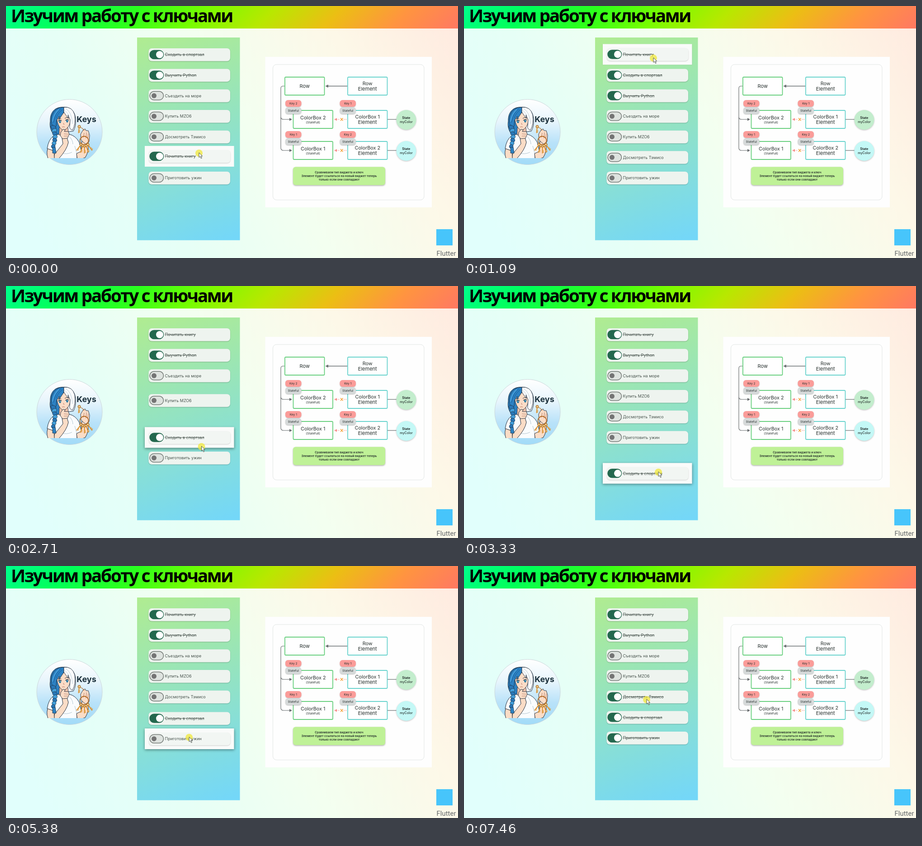
Write an HTML page with a canvas that moves like this. It is 1000 px wide and 560 px high and loops after 7.53 s.

```html
<!DOCTYPE html>
<html lang="ru">
<head>
<meta charset="utf-8">
<title>Изучим работу с ключами</title>
<style>
html, body { margin: 0; width: 100%; height: 100%; overflow: hidden; }
canvas { display: block; width: 1000px; height: 560px; }
</style>
</head>
<body>
<canvas id="stage"></canvas>
<script>
const W = 1000, H = 560, LOOP = 7530;
const dpr = window.devicePixelRatio || 1;
const stage = document.getElementById('stage');
const INTER = 'Inter, "Open Sans", sans-serif';

function setup(canvas) {
  canvas.width = W * dpr;
  canvas.height = H * dpr;
  const context = canvas.getContext('2d');
  context.scale(dpr, dpr);
  return context;
}

const screenCtx = setup(stage);
const backdrop = document.createElement('canvas');
let ctx = setup(backdrop);

// ---- drawing helpers ----
function gradient(x0, y0, x1, y1, colors) {
  const g = ctx.createLinearGradient(x0, y0, x1, y1);
  colors.forEach((c, i) => g.addColorStop(i / (colors.length - 1), c));
  return g;
}

function box(x, y, w, h, r, fill, line, lw = 1) {
  ctx.beginPath();
  ctx.roundRect(x, y, w, h, r);
  paint(fill, line, lw);
}

function disc(x, y, r, fill, line, lw = 1) {
  ctx.beginPath();
  ctx.arc(x, y, r, 0, 7);
  paint(fill, line, lw);
}

function oval(x, y, rx, ry, angle, fill, line, lw = 1) {
  ctx.beginPath();
  ctx.ellipse(x, y, rx, ry, angle, 0, 7);
  paint(fill, line, lw);
}

function paint(fill, line, lw) {
  if (fill) { ctx.fillStyle = fill; ctx.fill(); }
  if (line) { ctx.strokeStyle = line; ctx.lineWidth = lw; ctx.stroke(); }
}

function shape(d, fill, line, lw = 1) {
  const p = new Path2D(d);
  if (fill) { ctx.fillStyle = fill; ctx.fill(p); }
  if (line) { ctx.strokeStyle = line; ctx.lineWidth = lw; ctx.stroke(p); }
}

function shadowed(alpha, blur, dy, draw) {
  ctx.save();
  ctx.shadowColor = `rgba(0,0,0,${alpha})`;
  ctx.shadowBlur = blur * dpr;
  ctx.shadowOffsetY = dy * dpr;
  draw();
  ctx.restore();
}

function text(str, x, y, size, { weight = 400, color = '#27302e', align = 'center', font = INTER, spacing = 0 } = {}) {
  ctx.font = `${weight} ${size}px ${font}`;
  ctx.letterSpacing = spacing + 'px';
  ctx.textAlign = align;
  ctx.fillStyle = color;
  ctx.fillText(str, x, y);
}

// ---- still parts ----
function drawSlide() {
  ctx.fillStyle = gradient(100, 560, 1000, 0, ['#e1fffc', '#e6fff6', '#f3fff0', '#fdf8e8', '#ffe9df']);
  ctx.fillRect(0, 0, W, H);
  ctx.fillStyle = gradient(0, 0, 525, 525, ['#00ff8c', '#00ff5a', '#2cff1c', '#78fc00', '#b8e800', '#ecbe14', '#ff9440', '#ff7862']);
  ctx.fillRect(0, 0, W, 50);
  text('Изучим работу с ключами', 11, 36, 39, {
    weight: 700, color: '#000', align: 'left', font: '"Open Sans", "Noto Sans", sans-serif', spacing: -2.45
  });
  ctx.fillStyle = gradient(310, 60, 470, 525, ['#b0ec90', '#9ce6b2', '#88dfd6', '#74d7f8']);
  ctx.fillRect(290, 70, 227.5, 450.5);
  ctx.fillStyle = '#47c5fb';
  ctx.fillRect(952, 496, 36, 36);
  text('Flutter', 974, 555, 15, { color: '#626669', font: 'Roboto, sans-serif' });
}

function drawKey(x, y, angle, len) {
  ctx.save();
  ctx.translate(x, y);
  ctx.rotate(angle);
  disc(0, 0, 3, '#eeb050', '#8a4d18', 0.8);
  ctx.fillStyle = '#dc9434';
  ctx.fillRect(-1.1, 2.5, 2.2, len);
  ctx.fillRect(1, len - 1, 2.4, 1.6);
  ctx.fillRect(1, len - 4, 2, 1.5);
  disc(0, 0, 1, '#d8ecf6');
  ctx.restore();
}

function drawBadge() {
  const ink = '#1c2a3a', skin = '#fbdcc6', blue = '#2c82c4', white = '#fafcfd';
  disc(140.5, 280, 72.5, gradient(0, 208, 0, 352, ['#ffffff', '#e8f5fc', '#b8e2f9', '#a2dbf8']), '#cbd6da', 1);
  ctx.save();
  ctx.beginPath();
  ctx.rect(68, 208, 146, 130);
  ctx.clip();
  // hair behind, neck and shirt
  shape('M128 225C107 223 97 238 98 256C95 270 102 284 110 289L130 284V225Z', blue, ink);
  shape('M128 225C144 223 154 237 154 253Q155 267 149 278L132 280Z', white, ink);
  shape('M118 270L137 270L139 291L117 291Z', '#eec2aa', ink, 0.8);
  shape('M116 285Q126 293 140 285Q154 288 162 303L167 324L157 329L157 345L107 345L106 322L91 317Q94 296 106 288Z', white, ink);
  shape('M107 322L109 308M157 329L152 311M122 326Q133 331 146 325M140 290Q148 298 148 307', null, '#a9bdca', 0.9);
  // forearms
  shape('M92 317L106 322L108 345L96 345Q88 332 92 317Z', skin, ink);
  shape('M156 328L166 323L168 300L182 302Q184 324 175 337L158 342Z', skin, ink);
  shape('M107 330L126 306L123 288L133 286L138 303Q135 319 117 339L107 341Z', skin, ink);
  // face
  shape('M112 246Q113 267 125 276Q130 278 138 268Q144 259 143 242Q130 230 112 246Z', skin, ink, 0.9);
  shape('M115 251Q119 248 122 251M130 250Q135 246 139 249', null, ink, 1);
  for (const [x, y] of [[119, 257], [135, 255.5]]) {
    oval(x, y, 3.4, 3.2, 0, '#fff');
    oval(x + 0.4, y, 2.1, 3, 0, '#2c95bf', ink, 0.7);
    disc(x + 0.8, y - 1.1, 0.7, '#fff');
    shape(`M${x - 3.8} ${y - 1}Q${x} ${y - 5} ${x + 4.2} ${y - 2}`, null, ink, 1.1);
  }
  shape('M127 260L128.5 264M124 269Q127 267.5 130 269', null, '#a55d4b', 0.8);
  // fringe
  shape('M128 225Q108 224 101 245Q98 262 106 276L111 266L112 254L118 245L117 253L128 236Z', blue, ink, 0.9);
  shape('M128 225Q147 223 152 242Q155 262 147 276Q139 273 141 266L142 253L137 242L138 250L128 236Z', white, ink, 0.9);
  shape('M122 228Q109 236 105 259M125 230Q114 238 111 250', null, '#175c99', 1);
  shape('M117 230Q105 240 103 257', null, '#5cb4e8', 1.2);
  shape('M132 228Q146 236 147 262M130 232Q136 237 140 244', null, '#b4c6d2', 0.9);
  // braid
  for (let i = 0; i < 7; i++) {
    const tilt = i % 2 ? -0.6 : 0.6;
    oval(105 + 3.5 * Math.sin(i * 0.55), 270 + i * 7, 6.3 - i * 0.35, 4.4, tilt, i % 2 ? '#429fda' : '#2877b7', ink, 0.8);
  }
  shape('M103 314L109 314L111 327L103 327Z', blue, ink, 0.8);
  // hand at the chin
  shape('M120 288L121 281L126 274L131 275L129 279L138 279L140 285L136 294L125 295Z', skin, ink, 0.9);
  shape('M128 284L138 285M128 289L137 289', null, '#9a604c', 0.7);
  // raised hand with keys
  shape('M166 298L165 285L170 276L175 273L177 277L182 277L185 287L184 301L176 307Z', skin, ink, 0.9);
  shape('M173 282L171 292M178 281L177 294M182 284L181 294', null, '#9a604c', 0.8);
  disc(173, 299, 9.5, null, '#b36a24', 1.8);
  [0.65, 0.32, 0, -0.3, -0.62].forEach((a, i) =>
    drawKey(166 + i * 3.8, 308 + 3 * Math.sin(i * 0.8), a, 14));
  drawKey(162, 268, 0.1, 12);
  shape('M164 270Q169 270 173 277', null, '#b36a24', 1.1);
  ctx.restore();
  text('Keys', 178, 258, 18, { weight: 700, color: '#1b303b' });
}

const GREEN = '#69cf7f', TEAL = '#69d3cd', GREY = '#696e70';

function arrowHead(x, y, dir, color, size = 4) {
  shape(`M${x} ${y}l${-dir * size * 1.5} ${-size * 0.8}v${size * 1.6}Z`, color);
}

function node(x, y, line, first, second, small) {
  box(x, y, 87.5, 40, 2, '#fff', line, 1.8);
  const mid = x + 43.75;
  if (!second) return text(first, mid, y + 24, 11);
  text(first, mid, y + (small ? 20 : 18), 10.8);
  text(second, mid, y + (small ? 28.5 : 30), small ? 6.8 : 11);
}

function tags(x, y, key) {
  shadowed(0.25, 2, 1, () => box(x, y, 35.5, 15, 6, '#fb9c99'));
  shadowed(0.25, 2, 1, () => box(x, y + 16, 35.5, 15, 6, '#d6dada'));
  text(key, x + 17.75, y + 10, 6.6);
  text('Stateful', x + 17.75, y + 26, 6.7);
}

function stateRow(y, left, right, leftKey, rightKey, color) {
  const mid = y + 20;
  node(635.5, y, GREEN, left, '(Statefull)', true);
  node(756, y, TEAL, right, 'Element');
  tags(618, y - 23, leftKey);
  tags(738.5, y - 23, rightKey);
  arrowHead(633, mid, 1, GREY);
  shape(`M844 ${mid}H864`, null, GREY, 1.2);
  shadowed(0.25, 3, 1, () => disc(885.5, mid + 1, 22, color));
  text('State', 885.5, mid - 1, 7, { weight: 700 });
  text('myColor', 885.5, mid + 7.5, 7.1, { weight: 500 });
  ctx.setLineDash([1.6, 2.4]);
  shape(`M753 ${mid}H731`, null, '#f58d89', 1.3);
  ctx.setLineDash([]);
  arrowHead(726, mid, -1, '#f99693', 4);
  box(738, mid - 4, 9, 8, 0, '#fff');
  shape(`M740 ${mid - 3}l5.5 6m0 -6l-5.5 6`, null, '#f2a33a', 1.6);
}

function drawDiagram() {
  box(573.5, 113, 368.5, 334.5, 0, '#fefefe');
  box(590.5, 130, 334.5, 301, 8, '#fefefe', '#e1e5e4', 1);
  shape('M617 178H613Q608 178 608 183V315Q608 321 614 321H629M608 246Q608 252 614 252H629', null, GREY, 1.2);
  shape('M755 178H711', null, GREY, 1.4);
  arrowHead(706.5, 178, -1, GREY, 4.3);
  node(617, 158, GREEN, 'Row');
  node(756, 158, TEAL, 'Row', 'Element');
  stateRow(232, 'ColorBox 2', 'ColorBox 1', 'Key 2', 'Key 1', '#c3edcd');
  stateRow(301, 'ColorBox 1', 'ColorBox 2', 'Key 1', 'Key 2', '#c4f8f6');
  shadowed(0.3, 3, 1.5, () => box(635, 357.5, 204, 40.5, 6, '#bff197'));
  ['Сравниваем тип виджета и ключ',
   'Элемент будет ссылаться на новый виджет теперь',
   'только если они совпадают'].forEach((line, i) =>
    text(line, 737, 372 + i * 8.2, 6.5, { weight: 600 }));
}

// ---- motion ----
const slotY = i => 108 + i * 45.67;
const clamp = v => Math.max(0, Math.min(1, v));
const ease = v => v * v * (3 - 2 * v);

// Eased value between [time, value] keys.
function track(keys, t) {
  let i = 0;
  while (i < keys.length - 1 && t >= keys[i + 1][0]) i++;
  const [t0, v0] = keys[i];
  if (i === keys.length - 1 || t <= t0) return v0;
  const [t1, v1] = keys[i + 1];
  return v0 + (v1 - v0) * ease((t - t0) / (t1 - t0));
}

// moves: [start time, new slot]; on: time when the switch turns on
const items = [
  { label: 'Почитать книгу', slot: 0, on: -999 },
  { label: 'Сходить в спортзал', slot: 0, on: -999, moves: [[313, 1], [3500, 6], [5160, 5]] },
  { label: 'Выучить Python', slot: 1, on: -999, moves: [[225, 2], [2390, 1]] },
  { label: 'Съездить на море', slot: 2, moves: [[180, 3], [2445, 2]] },
  { label: 'Купить MZO6', slot: 3, moves: [[135, 4], [2530, 3]] },
  { label: 'Досмотреть Тэмисо', slot: 4, on: 6960, moves: [[95, 5], [2680, 4]] },
  { label: 'Приготовить ужин', slot: 6, on: 6480, moves: [[3020, 5], [5700, 6]] }
];

const drags = [
  { item: 0, from: 0, to: 1180, y: [[0, 334], [70, 332], [430, 108], [810, 106], [930, 106], [1180, 108]] },
  { item: 1, from: 2030, to: 3760, y: [[2030, 153.7], [2310, 153.7], [2710, 336.5], [3060, 398], [3260, 417], [3500, 414], [3760, 382]] },
  { item: 6, from: 4710, to: 5950, y: [[4710, 336.3], [4900, 336.3], [5250, 376], [5590, 400], [5700, 400], [5950, 382]] }
];

const cursorX = [[0, 427], [480, 418.5], [1000, 417], [1430, 434.5], [2310, 434.5], [2710, 432.5], [3400, 430],
  [3830, 408], [4110, 406.5], [5700, 405], [6270, 332.5], [6480, 331], [6850, 328], [7230, 328], [7460, 404]];
const cursorY = [[0, 326], [70, 325], [430, 110], [810, 108], [1000, 110], [1430, 152], [2310, 152], [2710, 356],
  [3060, 402], [3400, 414], [3830, 335], [4110, 332.5], [4900, 332.5], [5250, 372], [5590, 396], [5750, 396],
  [6270, 380], [6480, 381], [6850, 290], [7230, 291], [7460, 296]];

function restY(item, t) {
  let y = slotY(item.slot);
  for (const [start, slot] of item.moves || [])
    y += (slotY(slot) - y) * ease(clamp((t - start) / 255));
  return y;
}

function toggle(y, k) {
  const mix = (a, b) => Math.round(a + (b - a) * k);
  box(318, y - 9.5, 30.5, 19, 9.5, `rgb(${mix(222, 36)},${mix(227, 104)},${mix(223, 78)})`,
    `rgb(${mix(114, 36)},${mix(120, 104)},${mix(116, 78)})`, 1.5);
  const c = mix(116, 255);
  disc(327.5 + 12.5 * k, y, 5.5 + 2.5 * k, `rgb(${c},${c},${c})`);
}

// lift: null at rest, else the height of the held card from 0 to 1
function card(item, y, t, lift = null) {
  const held = lift !== null;
  const k = item.on === undefined ? 0 : ease(clamp((t - item.on) / 220));
  if (held) shadowed(0.4 * lift, 6 * lift, 2 * lift, () => box(307, y - 23, 197.5, 46, 0, '#fafbfa'));
  shadowed(held ? 0.18 : 0.24, 2, 1, () =>
    box(held ? 316 : 315.5, y - 14, 180.5, 28.5, 7, held ? '#f2f6f3' : '#eef4ef'));
  toggle(y, k);
  text(item.label, 351.5, y + 3.2, 9, { color: '#46524c', align: 'left' });
  if (k > 0) {
    ctx.fillStyle = '#46524c';
    ctx.fillRect(351.5, y - 0.4, ctx.measureText(item.label).width, 0.8);
  }
}

function pointer(x, y) {
  disc(x, y + 1, 8, 'rgba(240,232,60,0.75)');
  shape(`M${x} ${y}v10.5l2.5 -2.2l2 4.4l1.8 -0.8l-2 -4.3h3.4Z`, '#fff', '#3c443f', 0.9);
}

function render(t) {
  ctx.drawImage(backdrop, 0, 0, W, H);
  const drag = drags.find(d => t >= d.from && t < d.to);
  items.forEach((item, i) => {
    if (!drag || drag.item !== i) card(item, restY(item, t), t);
  });
  if (drag) {
    const lift = ease(clamp(Math.min(t - drag.from, drag.to - t) / 250));
    card(items[drag.item], track(drag.y, t), t, lift);
  }
  pointer(track(cursorX, t), track(cursorY, t));
}

drawSlide();
drawBadge();
drawDiagram();
ctx = screenCtx;

const begin = performance.now();
function tick() {
  render((performance.now() - begin) % LOOP);
  requestAnimationFrame(tick);
}
tick();
</script>
</body>
</html>
```
